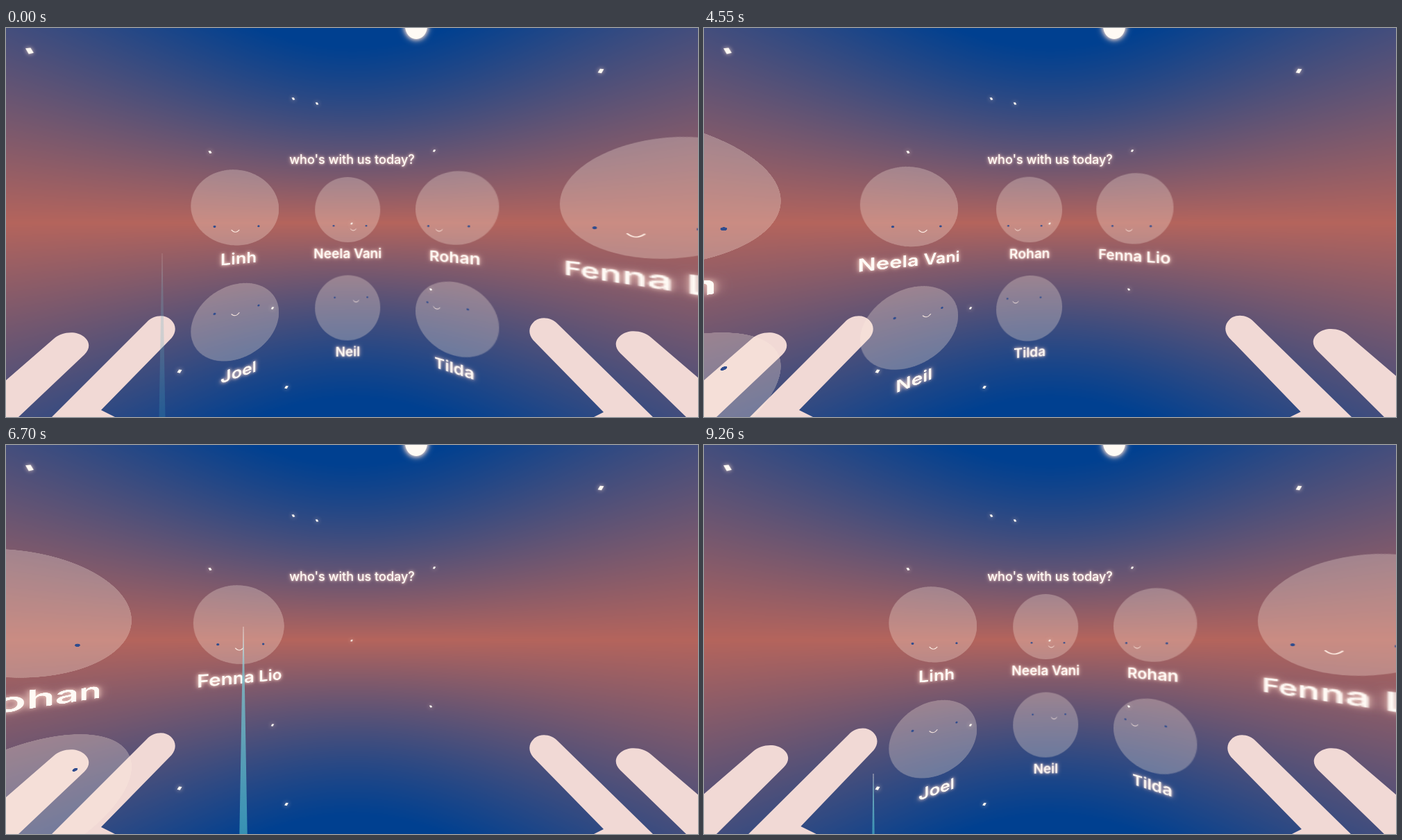
An HTML page with a canvas for the animation above (9330 ms loop, 997 px wide and 561 px high).

```html
<!DOCTYPE html>
<html lang="en">
<head>
<meta charset="utf-8">
<title>Who's with us today?</title>
<style>
  html, body { margin: 0; width: 100%; height: 100%; overflow: hidden; background: #004090; }
  #stage { position: relative; width: 997px; height: 561px; overflow: hidden; }
  #stage > * { position: absolute; left: 0; top: 0; width: 997px; height: 561px; }
  #ring { perspective: 280.5px; overflow: hidden; }
  .panel { position: absolute; left: 498.5px; top: 280.5px; width: 0; height: 0; }
  .panel svg { position: absolute; left: -50px; top: -50px; width: 100px; height: 100px; }
  .label, #stage .title {
    color: #fffaf5; text-align: center; white-space: nowrap;
    font-family: Inter, "Open Sans", sans-serif;
    text-shadow: 0 0 3px rgba(255, 222, 208, .85), 0 0 6px rgba(255, 205, 195, .75);
  }
  .label { position: absolute; left: -110px; top: 52px; width: 220px; font-size: 19px; font-weight: 600; line-height: 24px; }
  #stage .title { top: 178px; height: 24px; font-size: 18px; font-weight: 500; line-height: 24px; }
  #stars { filter: drop-shadow(0 0 3px rgba(255, 224, 206, .85)); }
  #moon { filter: drop-shadow(0 0 3px #ffe6d8) drop-shadow(0 0 5px rgba(255, 214, 200, .8)); }
</style>
</head>
<body>
<div id="stage">
  <canvas id="sky" width="997" height="561"></canvas>
  <svg viewBox="0 0 997 561" fill="#f1d9d5">
    <path id="left"/>
    <path id="right" transform="translate(998 0) scale(-1 1)"/>
  </svg>
  <div id="ring"></div>
  <svg viewBox="0 0 997 561">
    <defs>
      <linearGradient id="beamFill" x1="0" y1="0" x2="0" y2="1">
        <stop offset="0" stop-color="#f4e6e0"/>
        <stop offset=".22" stop-color="#7fbcc8"/>
        <stop offset="1" stop-color="#3f9fba"/>
      </linearGradient>
    </defs>
    <polygon id="beam" fill="url(#beamFill)"/>
    <ellipse id="moon" cx="591" cy="-3" rx="16" ry="19" fill="#fffaf4"/>
    <g id="stars" fill="#fffaf4"></g>
  </svg>
  <div class="title">who's with us today?</div>
</div>
<script>
const LOOP = 9330, CX = 498.5, CY = 280.5, F = 280.5, DEG = 180 / Math.PI;
const GAP = 28.83, SWIPE = 42.8;         // degrees between columns, degrees per swipe
const NEXT = [4300, 5240], BACK = [7700, 8700];
const $ = id => document.getElementById(id);
const clamp = v => Math.max(0, Math.min(1, v));
const smooth = v => { v = clamp(v); return v * v * (3 - 2 * v); };
const sum = (list, fn) => list.reduce((total, s) => total + fn(s), 0);

// The colour depends only on the angle above or below the horizon.
function paintSky() {
  const ctx = $('sky').getContext('2d'), img = ctx.createImageData(997, 561);
  const warm = [180, 100, 92], cool = [0, 64, 144];
  for (let y = 0, i = 0; y < 561; y++) {
    for (let x = 0; x < 997; x++) {
      const angle = Math.atan(Math.abs(y - CY) / Math.hypot(F, x - CX)) * DEG;
      const m = clamp(angle / 42);
      for (let c = 0; c < 3; c++) img.data[i++] = warm[c] + (cool[c] - warm[c]) * m;
      img.data[i++] = 255;
    }
  }
  ctx.putImageData(img, 0, 0);
}

// Stars grow and lean with their distance from the centre of the view.
function paintStars() {
  const stars = [[34, 33], [414, 102], [448, 109], [294, 179], [617, 177], [857, 62],
    [498, 282], [612, 377], [384, 404], [250, 495], [404, 518]];
  $('stars').innerHTML = stars.map(([x, y]) => {
    const dx = (x - CX) / F, dy = (y - CY) / F, size = 3.8 + 2.3 * (dx * dx + dy * dy);
    return `<polygon points="-.5,-.3 .12,-.36 .5,.25 -.1,.38"
      transform="translate(${x} ${y}) scale(${dx * dy < 0 ? -size : size} ${size})"/>`;
  }).join('');
}

function addPerson(name, look, col, { y, eyes }) {
  const el = document.createElement('div'), mid = look * .4;
  el.className = 'panel';
  el.innerHTML = `<svg viewBox="-50 -50 100 100">
    <circle r="47" fill="rgba(255,236,222,.29)"/>
    <g fill="#2f4c8e"><circle cx="${mid - 23.5}" cy="${eyes}" r="1.3"/><circle cx="${mid + 23.5}" cy="${eyes}" r="1.3"/></g>
    <path d="M${look - 4},${eyes + 4.5}q4,5 8,0" fill="none" stroke="#ffeee4" stroke-width=".85" stroke-linecap="round"/>
    </svg><div class="label">${name}</div>`;
  $('ring').append(el);
  return { el, angle: (col - 1) * GAP - 1.35, y };
}

// look: how far each face is turned sideways
const rows = [
  { y: -19, eyes: 23.3, names: ['Linh', 'Neela Vani', 'Rohan', 'Fenna Lio'], look: [-4, 8, -17, -4] },
  { y: 122.5, eyes: -15, names: ['Joel', 'Neil', 'Tilda'], look: [-4, 12, -20] }
];
const people = rows.flatMap(row => row.names.map((name, col) => addPerson(name, row.look[col], col, row)));

// pointer stops: time, x, y
const stops = [
  [0, 225, 325], [320, 10, 440], [700, 320, 300], [1540, 459, 335], [2350, 345, 300],
  [3300, 650, 300], [3620, 704, 447], [4090, 1012, 500], [6460, 1012, 400],
  [6700, 342, 262], [7380, 6, 480], [7460, 244, 474], [LOOP, 244, 474]
];

function pointer(t) {
  const i = stops.findIndex(s => s[0] > t), [t0, x0, y0] = stops[i - 1], [t1, x1, y1] = stops[i];
  const k = smooth((t - t0) / (t1 - t0));
  return [x0 + (x1 - x0) * k, y0 + (y1 - y0) * k];
}

// 0 to 1: how far the pointer is inside a panel
function hover(x, y, angle, row) {
  const a = Math.atan((x - CX) / F) * DEG - angle;
  const v = (y - CY) * Math.cos((angle + a) / DEG) / Math.cos(a / DEG);
  return smooth((10.4 - Math.abs(a)) / 1.4) * smooth((70 - Math.abs(v - row - 15)) / 4);
}

// A finger runs from base a around a rounded tip at (x, y) to base b.
const finger = (a, x, y, w, b) =>
  `M${a}L${x},${y}c${11 * w},-10 ${32 * w},-12 ${43 * w},-3c${9 * w},7 ${10 * w},17 ${w},26L${b}`;

// lift raises the fingertips; tilt moves the inner one down and the outer one up
function hand(lift, tilt) {
  return finger(`0,${508 - tilt - 5 * lift}`, 69 + 2 * lift, 448 - 6.5 * lift - tilt * .7, 1, '18,561L0,561Z') +
    finger(`${66 - 2 * lift},561`, 203 + 6 * lift, 424 - 7 * lift + tilt, .81,
      `${137 + 2.5 * lift},${551 + tilt - lift}L${157 + 5 * lift - 2 * tilt},561Z`);
}

function draw(t) {
  const swipe = s => 1 - (1 - clamp((t - s) / 470)) ** 2;
  const lift = s => Math.sin(Math.PI * clamp((t - s) / 1000)) ** 2;
  const turn = SWIPE * (sum(BACK, swipe) - sum(NEXT, swipe));
  const [x, y] = pointer(t);

  for (const p of people) {
    const a = p.angle + turn;
    p.el.style.display = Math.abs(a) > 78 ? 'none' : '';
    p.el.style.transform = `translateZ(${F}px) rotateY(${-a}deg) translateZ(${-F}px) ` +
      `translateY(${p.y}px) scale(${1 + .05 * hover(x, y, a, p.y)})`;
  }

  const half = (561 - y) * .019;
  $('beam').setAttribute('points', `${x - .4},${y} ${x + .4},${y} ${x + half},561 ${x - half},561`);
  $('beam').setAttribute('opacity', .25 + .6 * smooth(t / 200));
  $('left').setAttribute('d', hand(sum(BACK, lift), 0));
  $('right').setAttribute('d', hand(sum(NEXT, lift), 3));
}

paintSky();
paintStars();
const start = performance.now();
function frame() {
  draw((performance.now() - start) % LOOP);
  requestAnimationFrame(frame);
}
frame();
</script>
</body>
</html>
```
